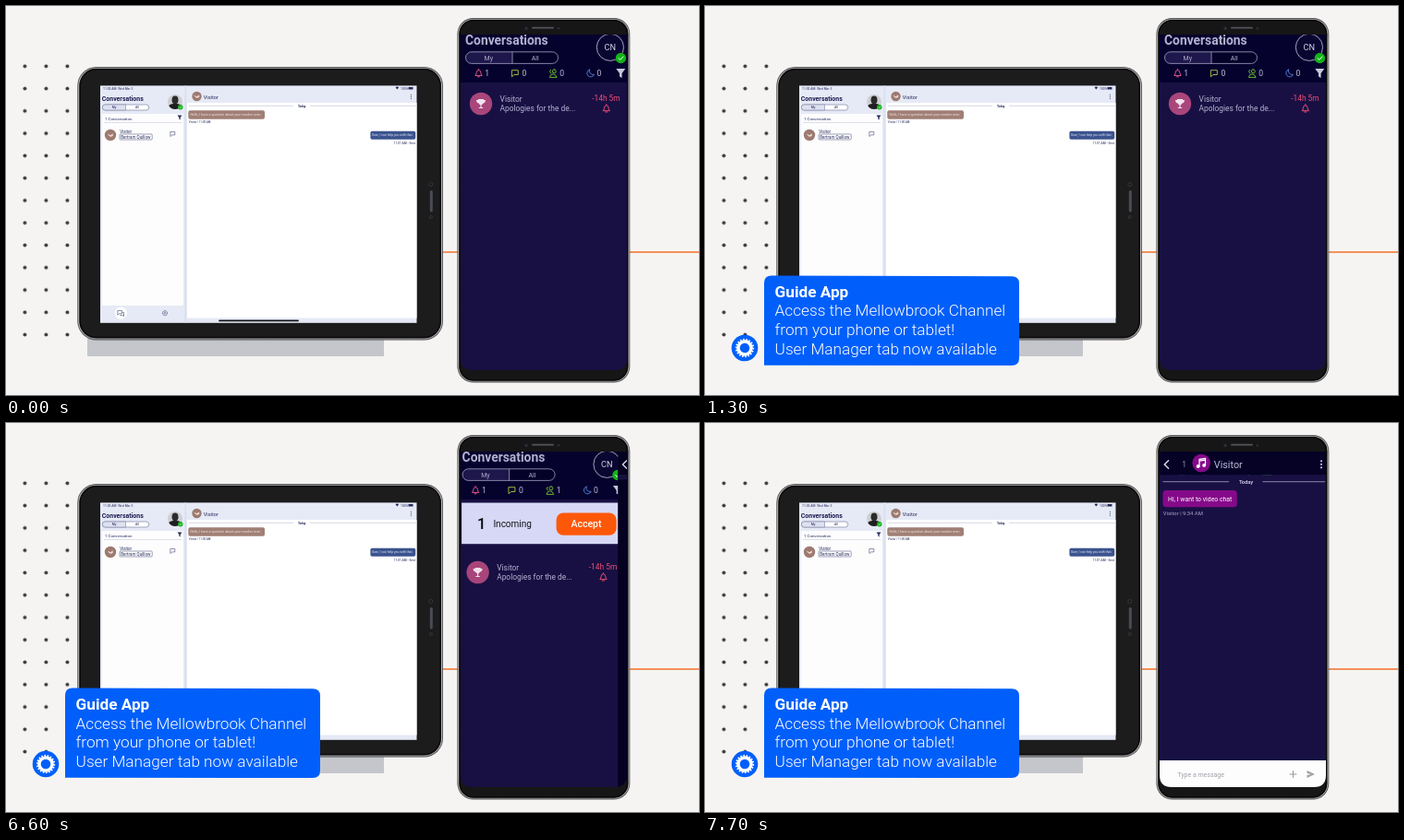
Write an HTML page that moves like this. It is 750x422 px and loops after 8000 ms.

```html
<!DOCTYPE html>
<html lang="en">
<head>
<meta charset="utf-8">
<title>Tablet and phone messaging</title>
<style>
html, body { margin: 0; width: 100%; height: 100%; overflow: hidden; background: #f5f4f2; }
svg.stage { display: block; width: 100vw; height: 100vh; font-family: Roboto, sans-serif; }
.bold { font-weight: 700; }
.mid { text-anchor: middle; }
.end { text-anchor: end; }
.line { fill: none; stroke-linecap: round; stroke-linejoin: round; }
.list { fill: #b4b2d2; font-size: 8.4px; }
.tablet { fill: #252a5c; }
.banner { fill: #fff; font-size: 17.2px; font-weight: 300; }
</style>
</head>
<body>
<svg class="stage" viewBox="0 0 750 422">
  <defs>
    <pattern id="dots" x="8.9" y="53.2" width="23" height="24.27" patternUnits="userSpaceOnUse">
      <circle cx="11.5" cy="12.1" r="2" fill="#3c3c3e"/>
    </pattern>
    <clipPath id="phoneScreen"><path d="M492 31H672V382Q672 395 659 395H505Q492 395 492 382Z"/></clipPath>
    <clipPath id="portrait"><circle cx="183" cy="104" r="8"/></clipPath>
    <linearGradient id="gloss" x2="0" y2="1">
      <stop offset="0" stop-color="#8c8c8f"/><stop offset=".06" stop-color="#b9b9bc"/>
      <stop offset=".94" stop-color="#b9b9bc"/><stop offset="1" stop-color="#8c8c8f"/>
    </linearGradient>
    <path id="bell" class="line" d="M-3.4 2.4Q-2.3 1.3 -2.3 -.6Q-2.2 -3 0 -3.3Q2.2 -3 2.3 -.6Q2.3 1.3 3.4 2.4ZM-.9 4H.9M0 -4.3V-3.4"/>
    <path id="speech" class="line" d="M-3.3 -2.8H3.3V2H-1L-3.3 4Z"/>
    <path id="funnel" d="M-5 -5H5L1.3 0V5L-1.3 3.4V0Z"/>
    <path id="trophy" d="M-3 -5H3V-4H5Q4.8 -.8 2.4 -.4Q1.6 1 .6 1.3V4H2.2V5H-2.2V4H-.6V1.3Q-1.6 1 -2.4 -.4Q-4.8 -.8 -5 -4H-3Z"/>
    <path id="dove" d="M-3 -1.6L0 .2L2.6 -1.8L2.8 .8Q1 2.2 -.6 1.4Q-2.4 .6 -3 -1.6Z"/>
  </defs>

  <rect width="750" height="422" fill="#f5f4f2"/>
  <rect x="8" y="54" width="70" height="314" fill="url(#dots)"/>
  <path d="M470 267H750" stroke="#f36f28" stroke-width="1.7"/>
  <rect x="88" y="355" width="321" height="25" fill="#c4c6cc"/>

  <!-- tablet -->
  <rect x="77.3" y="65.9" width="395.7" height="296.6" rx="20.5" fill="#4a4a4c"/>
  <rect x="78.8" y="67.4" width="392.7" height="293.6" rx="19" fill="#1c1c1d" stroke="url(#gloss)" stroke-width="1.3"/>
  <rect x="80.2" y="68.8" width="389.9" height="290.8" rx="17.6" fill="none" stroke="#0a0a0a" stroke-width="1.5"/>
  <path class="line" d="M460.3 201.5V222" stroke="#4b4b56" stroke-width="3"/>
  <g fill="#17171c" stroke="#3e3e4a" stroke-width=".8">
    <circle cx="459.8" cy="193.5" r="2"/><circle cx="459.8" cy="229" r="1.5"/>
  </g>
  <rect x="102" y="86.4" width="342.5" height="257.4" fill="#e6eaf6"/>
  <rect x="104" y="117" width="88" height="208" rx="1.5" fill="#fdfdfe"/>
  <rect x="196" y="105" width="248.5" height="233.5" fill="#fff"/>
  <path d="M194.3 86.4V343.8" stroke="#dbe0f0" stroke-width="2"/>
  <g class="tablet">
    <text x="105" y="90.5" font-size="3.4" xml:space="preserve">11:02 AM  Wed Mar 3</text>
    <text x="427" y="90.6" font-size="3.4">100%</text>
    <path d="M421.5 88.3Q423.3 86.8 425.2 88.3L423.3 90.6ZM435.5 88H440.5V90.4H435.5Z"/>
    <text x="103.8" y="102.7" font-size="6.95" class="bold" fill="#1b1c50">Conversations</text>
    <rect x="104.3" y="107" width="50.5" height="6" rx="3" fill="#fff" stroke="#6a7096" stroke-width=".6"/>
    <path d="M129.5 107V113H107.3A3 3 0 0 1 107.3 107Z" fill="#dde1f0" stroke="#6a7096" stroke-width=".5"/>
    <g font-size="3.5" class="mid"><text x="117" y="111.3">My</text><text x="142" y="111.3">All</text></g>
    <g clip-path="url(#portrait)">
      <rect x="175" y="96" width="16" height="16" fill="#cfd0d3"/>
      <path d="M175 113Q175 106 181 106H185Q191 106 191 113Z" fill="#1e1e20"/>
      <ellipse cx="183" cy="102" rx="3.5" ry="4.4" fill="#2b2b2d"/>
    </g>
    <circle cx="188.8" cy="109.8" r="2.7" fill="#18b41c"/>
    <path class="line" d="M187.6 109.9L188.5 110.8L190 109" stroke="#fff" stroke-width=".5"/>
    <text x="107" y="123.5" font-size="4.4">1 Conversation</text>
    <path d="M106 126.5H190" stroke="#c9cbd6" stroke-width=".6"/>
    <use href="#funnel" transform="translate(188 121) scale(.5)"/>
    <circle cx="113" cy="140" r="6.2" fill="#9d7a70"/>
    <use href="#dove" x="113" y="140" fill="#ead9d3"/>
    <text x="123.2" y="137.7" font-size="4.5">Visitor</text>
    <rect x="123" y="139" width="35.2" height="6" rx=".8" fill="#fff" stroke="#5b6088" stroke-width=".6"/>
    <text x="124.3" y="143.5" font-size="4.5">Bertram Quillow</text>
    <use href="#speech" transform="translate(180.5 138.5) scale(.7)" stroke="#4c5078" stroke-width=".9"/>
    <circle cx="124.3" cy="333.2" r="6.6" fill="#fff"/>
    <g stroke="#50567c" stroke-width="1">
      <use href="#speech" transform="translate(123.3 332.3) scale(.65)"/>
      <path class="line" d="M126.5 332.5H127.5V336.5L126 335.4H123.5" stroke-width=".7"/>
      <circle cx="172" cy="333.2" r="2.5" fill="none" stroke-dasharray="1.2 .5"/>
      <circle cx="172" cy="333.2" r=".9" fill="none" stroke-width=".6"/>
    </g>
    <circle cx="206.5" cy="98" r="5.2" fill="#9d7a70"/>
    <use href="#dove" x="206.5" y="98" fill="#ead9d3"/>
    <text x="213.8" y="100.8" font-size="5.6">Visitor</text>
    <path d="M438.4 96.3V101" class="line" stroke="#2b2e58" stroke-width="1" stroke-dasharray=".1 1.9"/>
    <path d="M198 108.3H311M329 108.3H444" stroke="#c3c6d4" stroke-width=".7"/>
    <text x="320.2" y="109.6" font-size="3.2" class="mid bold">Today</text>
    <rect x="197.3" y="113.3" width="82.7" height="9.4" rx="2" fill="#a07f75"/>
    <text x="199.4" y="119.2" font-size="3.6" fill="#f4e9e5">Hello, I have a question about your smoker oven</text>
    <text x="197.8" y="127.2" font-size="3">Visitor | 11:00 AM</text>
    <rect x="394.4" y="135.8" width="48.8" height="8.9" rx="1.8" fill="#3b538e"/>
    <text x="396" y="141.4" font-size="3.45" fill="#e7ecf9">Sure, I can help you with that.</text>
    <text x="443" y="149.6" font-size="3.3" class="end">11:01 AM &#8226; Sent</text>
  </g>
  <path class="line" d="M231 341.4H316" stroke="#101012" stroke-width="1.7"/>

  <!-- phone -->
  <rect x="488.4" y="12.9" width="186.9" height="395.7" rx="17.5" fill="#4a4a4c"/>
  <rect x="489.8" y="14.3" width="184.1" height="392.9" rx="16.2" fill="#161616" stroke="url(#gloss)" stroke-width="1.3"/>
  <rect x="491.1" y="15.6" width="181.5" height="390.3" rx="15" fill="none" stroke="#050505" stroke-width="1.4"/>
  <path class="line" d="M570 23.7H592" stroke="#55555b" stroke-width="1.8"/>
  <g fill="#2c2c3c"><circle cx="563" cy="24.3" r="1.8"/><circle cx="598" cy="24.3" r="1.3"/></g>
  <g clip-path="url(#phoneScreen)">
    <rect x="492" y="31" width="180" height="365" fill="#181043"/>
    <g id="inbox">
      <rect x="492" y="31" width="180" height="52" fill="#06022e"/>
      <text x="497" y="41.8" font-size="13.85" class="bold" fill="#b4b2d2">Conversations</text>
      <circle cx="653.9" cy="44.8" r="14.6" fill="#0a0632" stroke="#b5b4c8" stroke-width=".9"/>
      <text x="653.7" y="48.2" font-size="9.2" class="mid" fill="#d3d2e2">CN</text>
      <circle cx="665.4" cy="56.5" r="5.7" fill="#13b318"/>
      <path class="line" d="M663 56.7L664.8 58.4L668 54.9" stroke="#eaffea" stroke-width="1"/>
      <rect x="497.5" y="49.8" width="100" height="12.6" rx="6.3" fill="#05022a"/>
      <path d="M548 49.8V62.4H503.8A6.3 6.3 0 0 1 503.8 49.8Z" fill="#1d174c"/>
      <path d="M548 49.8V62.4" stroke="#a5a3c2" stroke-width=".8"/>
      <rect x="497.5" y="49.8" width="100" height="12.6" rx="6.3" fill="none" stroke="#a5a3c2" stroke-width=".8"/>
      <g font-size="7" class="mid" fill="#b4b2d2"><text x="522.3" y="58.6">My</text><text x="572.8" y="58.6">All</text></g>
      <g stroke-width="1">
        <use href="#bell" x="511.5" y="72.8" stroke="#dc4f85"/>
        <use href="#speech" x="551" y="72.5" stroke="#a1b53a"/>
        <path class="line" d="M593.3 68.8A2 2 0 1 0 593.3 72.8A2 2 0 1 0 593.3 68.8M588.5 77Q589 73.8 592 73.8Q595 73.8 596 77ZM589.5 69.3Q587.2 71 589.7 73" stroke="#69b52c"/>
        <path class="line" d="M631.4 69.1A4 4 0 1 0 636.5 74.3A4.2 4.2 0 0 1 631.4 69.1Z" stroke="#4d79cf"/>
      </g>
      <use href="#funnel" x="665.3" y="73" fill="#c8c7dc"/>
      <g font-size="8.6" fill="#bcbada">
        <text x="518.3" y="76.2">1</text><text x="558.4" y="76.2">0</text>
        <text x="599.2" y="76.2" id="queueCount">0</text><text x="639.4" y="76.2">0</text>
      </g>
      <g id="incoming">
        <rect x="496.5" y="86.5" width="175.5" height="44.7" fill="#d9daf7"/>
        <text x="513.5" y="115" font-size="16.5" font-weight="500" fill="#08080c">1</text>
        <text x="530.8" y="112.7" font-size="10" fill="#15151c">Incoming</text>
        <rect x="599" y="97.5" width="65" height="24.3" rx="7.5" fill="#ff590a"/>
        <text x="631.4" y="113.4" font-size="10.5" font-weight="500" class="mid" fill="#fff">Accept</text>
      </g>
      <g id="row">
        <circle cx="514" cy="106" r="12.2" fill="#a9467b"/>
        <use href="#trophy" x="514" y="106" fill="#f3e3ee"/>
        <text class="list" x="534.6" y="103.7">Visitor</text>
        <text class="list" x="534.6" y="114">Apologies for the de...</text>
        <text x="664.7" y="103.2" font-size="8.4" class="end" fill="#ec4c78">-14h 5m</text>
        <use href="#bell" x="649.8" y="111" stroke="#ec4c78" stroke-width="1"/>
      </g>
    </g>
    <rect id="shade" x="492" y="31" width="180" height="365"/>
    <g id="panel">
      <g id="loading">
        <rect x="492" y="31" width="184" height="365" fill="#050221"/>
        <rect x="492" y="56" width="184" height="5.5" fill="#17113f"/>
        <g id="spinner" class="line" stroke="#9896b4" stroke-width="1.1"></g>
      </g>
      <g id="chat">
        <rect x="492" y="31" width="180" height="25.3" fill="#050225"/>
        <rect x="492" y="56.3" width="180" height="310" fill="#181043"/>
        <text x="516.3" y="48.2" font-size="8.4" fill="#8f8db0">1</text>
        <circle cx="537.2" cy="43.5" r="9.8" fill="#860a8a"/>
        <path class="line" d="M535 47V39.5L541.5 38.4V45.8M535 41.2L541.5 40.1" stroke="#fff" stroke-width="1.3"/>
        <g fill="#fff"><circle cx="533.6" cy="47" r="1.9"/><circle cx="540.1" cy="45.9" r="1.9"/></g>
        <text x="550.8" y="48.6" font-size="10.8" fill="#bcbada">Visitor</text>
        <path class="line" d="M667 41.3V48.6" stroke="#d4d3e4" stroke-width="1.9" stroke-dasharray=".1 3.4"/>
        <path d="M495.5 63.7H567M603.5 63.7H671" stroke="#a7a5c6" stroke-width=".8"/>
        <text x="585.5" y="66" font-size="5.7" class="mid bold" fill="#c3c1dc">Today</text>
        <rect x="495.5" y="73" width="80.3" height="18.2" rx="3.5" fill="#850a89"/>
        <text x="501" y="84.6" font-size="6.9" fill="#fff">Hi, I want to video chat</text>
        <text x="495.8" y="99.6" font-size="5.9" fill="#aaa8c6">Visitor | 9:34 AM</text>
        <rect x="492" y="366" width="180" height="30" fill="#fdfdfe"/>
        <text x="511.3" y="383.6" font-size="7" fill="#a2a2a8">Type a message</text>
        <path class="line" d="M633 381H640M636.5 377.5V384.5" stroke="#96969c" stroke-width="1"/>
        <path d="M651.5 377L660 381L651.5 385V382L656 381L651.5 380Z" fill="#a0a0a6"/>
      </g>
      <path class="line" d="M501.6 40.7L497.2 45L501.6 49.3" stroke="#dad9e8" stroke-width="1.4"/>
    </g>
  </g>

  <!-- banner -->
  <g id="banner">
    <path d="M72 287.4L332 288.2Q340 288.2 340 296V377Q340 385 332 385L64 384.8V295.4Q64 287.4 72 287.4Z" fill="#005ffa"/>
    <g class="banner">
      <text x="75.6" y="310.8" class="bold">Guide App</text>
      <text x="75.6" y="331.5">Access the Mellowbrook Channel</text>
      <text x="75.6" y="352.1">from your phone or tablet!</text>
      <text x="75.6" y="372.7">User Manager tab now available</text>
    </g>
  </g>
  <g id="gear">
    <circle r="14.3" fill="#005ffa"/>
    <g fill="none" stroke="#fff">
      <circle r="7" stroke-width="3.4"/>
      <circle r="9.2" stroke-width="2" pathLength="36" stroke-dasharray="1 1"/>
    </g>
  </g>
</svg>
<script>
const LOOP = 8000, STEP = 100, SPOKES = 8;
const el = id => document.getElementById(id);
const progress = (t, from, to) => Math.min(1, Math.max(0, (t - from) / (to - from)));
const remaining = (t, from, to, power) => (1 - progress(t, from, to)) ** power;
const move = (id, x, y, extra = '') => el(id).setAttribute('transform', `translate(${x} ${y}) ${extra}`);
const show = (id, on) => { el(id).style.display = on ? '' : 'none'; };

el('spinner').innerHTML = Array.from({ length: SPOKES }, (_, i) =>
  `<path d="M0 -2.5V-4.6" transform="rotate(${i * 360 / SPOKES})" opacity="${.2 + .8 * i / SPOKES}"/>`).join('');

function draw(t) {
  // banner and gear settle from below the stage
  const settled = t >= 1700;
  const gearLeft = settled ? 0 : remaining(t, 400, 1876, 5);
  move('banner', 0, settled ? 0 : 140 * remaining(t, 400, 2250, 5));
  move('gear', 43, 370 + 112 * gearLeft, `rotate(${-180 * gearLeft})`);

  const arrived = t >= 5100;
  show('incoming', arrived);
  move('row', 0, arrived ? 56 : 0);
  el('queueCount').textContent = arrived ? 1 : 0;

  // the chat pushes over the list, which dims and trails behind it
  const left = remaining(t, 6580, 7240, 2);
  move('panel', 181 * left, 0);
  move('inbox', -57 * (1 - left), 0);
  el('shade').setAttribute('opacity', .12 * (1 - left));
  show('panel', left < 1);
  show('loading', t < 7700);
  show('chat', t >= 7700);
  const turn = Math.floor(Math.min(t, 7300) / STEP) * 360 / SPOKES;
  move('spinner', 584, 229.3, `rotate(${turn % 360})`);
}

const start = performance.now();
function tick() {
  const t = (performance.now() - start) % LOOP;
  draw(Math.floor(t / STEP) * STEP);
  requestAnimationFrame(tick);
}
tick();
</script>
</body>
</html>
```
